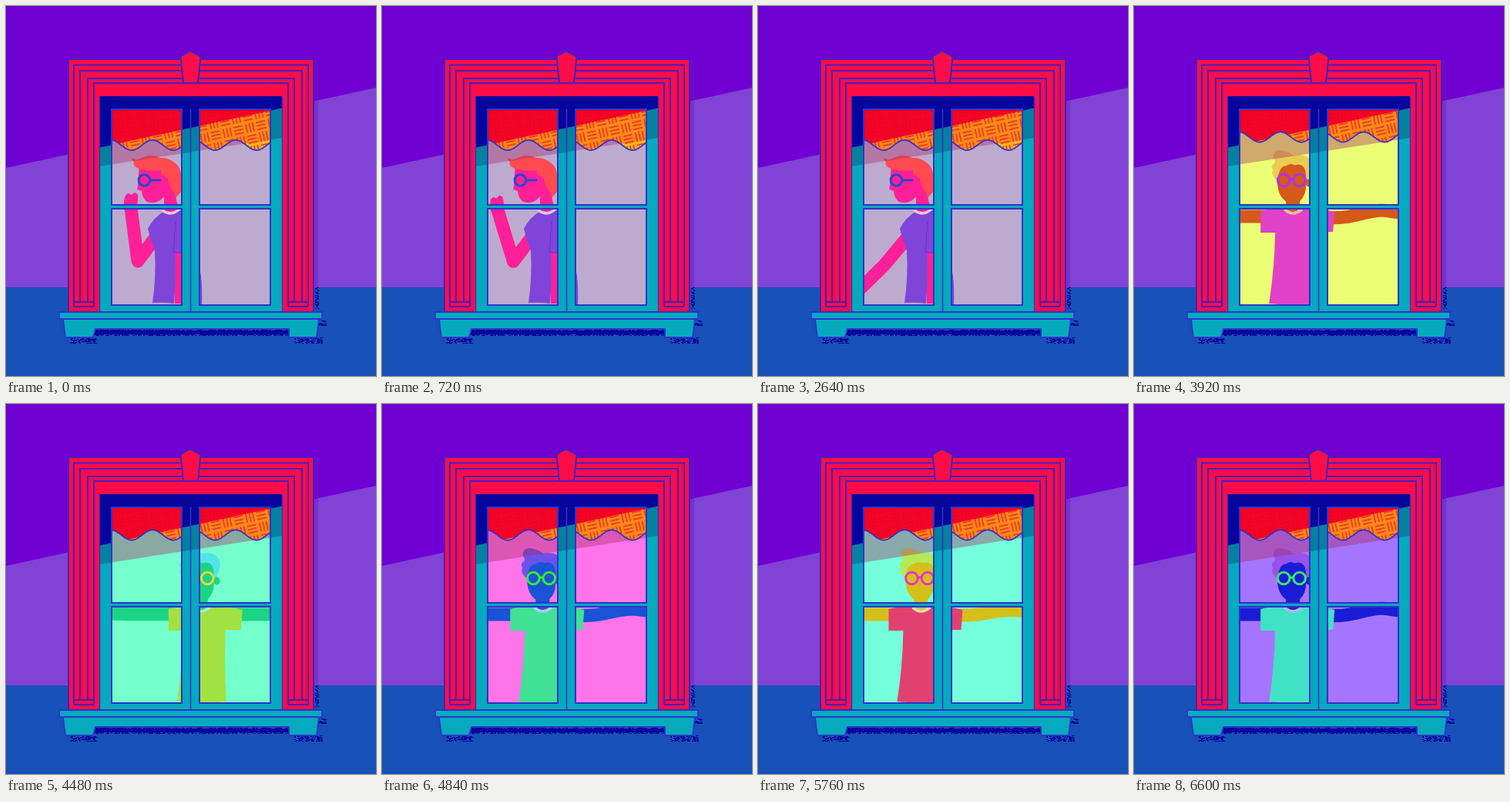
Animation, 480 px wide and 480 px high, one loop 6.64 s. Source, as an HTML page with a canvas:

```html
<!DOCTYPE html>
<html lang="en">
<head>
<meta charset="utf-8">
<title>Window dance</title>
<style>
html, body { margin: 0; width: 100%; height: 100%; overflow: hidden; background: #7000d2; }
canvas { display: block; width: 100vmin; height: 100vmin; }
</style>
</head>
<body>
<canvas id="stage" width="480" height="480"></canvas>
<script>
const ctx = document.getElementById('stage').getContext('2d');
const LOOP = 6640, LIGHTS_ON = 2990, BEAT = 2680 / 3;
const BLUE = '#2c34cc', TRIM = '#4420bc', NAVY = '#07069c', TEAL = '#06a9bd', RED = '#fc0d49';
const PANES = [[137, 134, 91, 124], [251, 134, 92, 124], [137, 263, 91, 125], [251, 263, 92, 125]];
const TAU = Math.PI * 2;

const clamp = v => Math.max(0, Math.min(1, v));
const mix = (a, b, k) => a + (b - a) * k;
const smooth = k => k * k * (3 - 2 * k);
const hsl = (h, s, l) => `hsl(${((h % 360) + 360) % 360},${s}%,${l}%)`;
const beamY = x => 210 - x * 0.2167;

// Piecewise linear value, extended past both ends
function along(points, x) {
  let i = 1;
  while (i < points.length - 1 && x > points[i][0]) i++;
  const [a, b] = [points[i - 1], points[i]];
  return mix(a[1], b[1], (x - a[0]) / (b[0] - a[0]));
}

function random(seed) {
  return () => (seed = (seed * 16807) % 2147483647) / 2147483647;
}

function rect(x, y, w, h, fill) {
  ctx.fillStyle = fill;
  ctx.fillRect(x, y, w, h);
}

function path(d, fill, line, width = 2) {
  const p = new Path2D(d);
  if (fill) { ctx.fillStyle = fill; ctx.fill(p); }
  if (line) { ctx.strokeStyle = line; ctx.lineWidth = width; ctx.stroke(p); }
}

function disc(x, y, rx, ry, fill) {
  ctx.beginPath();
  ctx.ellipse(x, y, rx, ry, 0, 0, TAU);
  ctx.fillStyle = fill;
  ctx.fill();
}

function ring(x, y, r, color) {
  ctx.beginPath();
  ctx.arc(x, y, r, 0, TAU);
  ctx.strokeStyle = color;
  ctx.lineWidth = 3;
  ctx.stroke();
}

function clipPanes() {
  ctx.beginPath();
  for (const p of PANES) ctx.rect(...p);
  ctx.clip();
}

function speckle(x, y, w, h, seed) {
  const rnd = random(seed);
  ctx.fillStyle = NAVY;
  for (let n = w * h * 0.45; n > 0; n--) {
    ctx.fillRect(x + Math.floor(rnd() * w), y + Math.floor(rnd() * h), 2, 1);
  }
}

function wall() {
  rect(0, 0, 480, 480, '#7000d2');
  path(`M0 ${beamY(0)}L480 ${beamY(480)}V365H0Z`, '#8043d5');
  rect(0, 365, 480, 115, '#1851b7');
  rect(400, 70, 5, 295, 'rgba(96,30,190,.4)');
  speckle(401, 365, 4, 28, 11);
}

function frame() {
  rect(80, 69, 320, 327, RED);
  const lines = [[81, 69, 396], [88, 76.5, 390], [96, 84, 384], [106, 94, 384], [114, 100, 390]];
  for (const [x, y, b] of lines) path(`M${x} ${b}V${y}H${480 - x}V${b}`, null, TRIM, 2);
  for (const x of [88, 366]) {
    path(`M${x} 384h26M${x} 390h26`, null, TRIM, 1.8);
  }
  path('M226.5 65.5L239 58.5L252.5 65.5L249 100H230Z', RED, TRIM, 2);
}

function sash() {
  ctx.save();
  ctx.beginPath();
  ctx.rect(121, 117, 238, 280);
  for (const p of PANES) ctx.rect(...p);
  ctx.clip('evenodd');
  rect(121, 117, 238, 280, TEAL);
  path('M121 208L359 171V117H121Z', '#06809f');
  path(`M121 ${beamY(121)}L359 ${beamY(359)}V117H121Z`, NAVY);
  ctx.restore();
  path('M239.5 134V396', null, BLUE, 1.6);
  for (const p of PANES) {
    ctx.strokeStyle = BLUE;
    ctx.lineWidth = 2;
    ctx.strokeRect(...p);
  }
  path('M121.5 117V396M358.5 117V396', null, BLUE, 1.4);
}

function sill() {
  speckle(115, 419, 252, 9, 5);
  rect(116, 421, 250, 5, NAVY);
  speckle(83, 431, 34, 7, 7);
  speckle(374, 430, 36, 8, 9);
  speckle(406, 408, 9, 7, 13);
  path('M74 406H406L403 430H367V419H116L113 430H77Z', TEAL, BLUE, 1.8);
  path('M69 397H410V406H69Z', TEAL, BLUE, 1.8);
}

// Basket weave of three-bar groups
function weave(color, shift) {
  ctx.save();
  ctx.translate(240, 160 + shift);
  ctx.rotate(-0.22);
  ctx.strokeStyle = color;
  ctx.lineWidth = 1.9;
  ctx.beginPath();
  for (let i = -8; i < 8; i++) {
    for (let j = -4; j < 4; j++) {
      for (const k of [-4.5, 0, 4.5]) {
        const x = i * 15, y = j * 15;
        if ((i + j) % 2) { ctx.moveTo(x - 6, y + k); ctx.lineTo(x + 6, y + k); }
        else { ctx.moveTo(x + k, y - 6); ctx.lineTo(x + k, y + 6); }
      }
    }
  }
  ctx.stroke();
  ctx.restore();
}

function blind(mid) {
  let d = '';
  for (let x = 135; x <= 346; x++) {
    d += `${d ? 'L' : 'M'}${x} ${mid - 6.6 * Math.cos(TAU * (x - 190) / 54)}`;
  }
  ctx.save();
  ctx.clip(new Path2D(d + 'V130H135Z'));
  rect(135, 130, 212, 62, '#ff8a12');
  path('M251 188L346 173V195H251Z', '#ffb018');
  weave('#ee3b2c', mid - 181);
  ctx.clip(new Path2D(`M121 ${beamY(121)}L359 ${beamY(359)}V117H121Z`));
  rect(135, 130, 212, 62, '#f40324');
  weave('rgba(205,0,50,.25)', mid - 181);
  ctx.restore();
  path(d, null, BLUE, 1.8);
}

function thinker(t) {
  const skin = '#ff2098', shirt = '#8045d8', hair = '#ff4a50';
  // Back, far arm and shirt
  path('M219 318H230V386H219Z', skin);
  path('M246 325Q256 345 254 388H240Z', shirt);
  path('M204 238L220 236Q219 252 226 266L206 270Z', skin);
  path('M173 206L171 234L170 238L176 240Q177 250 183 254Q196 258 204 248L218 240V205Z', skin);
  path('M162 196Q168 202 176 197Q188 191 200 197Q212 196 222 206Q229 213 228 240L220 249Q219 240 212 233Q211 222 205 220Q200 218 201 213Q186 215 172 211Q163 206 166 203Z', hair);
  ring(179.5, 226, 7.3, '#2846cc');
  path('M187 226H201', null, '#2846cc', 3);

  // Arm swings from the chin down to the switch
  const k = smooth(clamp((t - 640) / 480));
  const ex = mix(171, 164, k), ey = mix(331, 336, k);
  const angle = mix(-1.70, -3.92, k), reach = mix(76, 54, k);
  const hx = ex + Math.cos(angle) * reach, hy = ey + Math.sin(angle) * reach;
  ctx.strokeStyle = skin;
  ctx.lineCap = ctx.lineJoin = 'round';
  ctx.lineWidth = 17;
  ctx.beginPath();
  ctx.moveTo(194, 300);
  ctx.lineTo(ex, ey);
  ctx.lineTo(hx, hy);
  ctx.stroke();
  ctx.save();
  ctx.translate(hx, hy);
  ctx.rotate(angle + 1.7);
  path('M-8 4Q-9 -10 -3 -13L2 -11L6 -14Q11 -12 10 -6Q10 2 6 6Z', skin);
  ctx.restore();
  ctx.lineCap = 'butt';
  ctx.lineJoin = 'miter';

  path('M204 267Q215 274 226 263L230 264V320H219Q221 350 218 386Q203 384 190 385Q195 352 193 318Q187 303 184 289Q191 275 204 267Z', shirt);
  path('M220 280L217 320H229', null, '#6830c4', 1);
  path('M203 265Q214 274 227 262', null, '#eac6dc', 3.5);
}

const REST = [[0, 273], [40, 273], [90, 271]];
const RIGHT_WAVE = [[0, 275], [17, 274], [45, 267], [62, 264], [85, 268], [140, 271]];
const LEFT_WAVE = [[0, 270], [28, 269], [45, 273], [62, 278], [90, 271], [120, 270]];

function arm(x, dir, wave, amount, color) {
  ctx.beginPath();
  for (let s = -12; s <= 125; s += 4) {
    // Light averaging rounds off the bends
    let y = 0;
    for (const o of [-6, 0, 6]) {
      const q = Math.max(0, s + o);
      y += mix(along(REST, q), along(wave, q), amount) / 3;
    }
    ctx.lineTo(x + dir * s, y);
  }
  ctx.strokeStyle = color;
  ctx.lineWidth = 17;
  ctx.stroke();
}

function dancer(t, phase) {
  const turn = along([[3920, 50], [4480, 184], [5200, 319], [6600, 629]], t);
  const skin = hsl(330 + turn, 78, 47), shirt = hsl(260 + turn, 73, 57);
  const hair = hsl(358 + turn, 78, 62), glasses = hsl(229 + turn, 82, 56);
  const dx = 64.5 * (1 - Math.cos(phase * TAU)) / 2;
  const side = Math.cos(phase * TAU);
  ctx.save();
  ctx.translate(dx, 0);
  arm(163, -1, LEFT_WAVE, clamp(-side * 1.8 - 0.8), skin);
  arm(258, 1, RIGHT_WAVE, clamp(side * 1.8 - 0.8), skin);
  path('M163 266Q180 262 194 263Q205 272 217 263Q238 262 259 267L257 293H237Q235 340 238 386Q205 389 174 386Q181 342 182 294H163Z', shirt);
  path('M196 246H214V263Q205 271 196 263Z', skin);
  path('M194 264Q205 274 217 264', null, hsl(318 + turn, 60, 80), 3.5);
  path('M179 196Q180 187 188 187Q198 188 206 194Q222 191 228 200Q232 208 228 218L222 230H188L182 224Q176 218 179 213Q175 207 181 204Q183 201 179 196Z', hair);
  disc(225.5, 229.5, 4.3, 5, skin);
  path('M186 220Q189 207 196 207.5Q201 203 207 206.5Q215 204 219 209Q223 214 222 232Q222 246 214 253Q205 260 195 253Q186 246 185 232Z', skin);
  ring(193, 226, 7.8, glasses);
  ring(213.5, 226, 7.8, glasses);
  path('M200 225H206', null, glasses, 3);
  ctx.restore();
}

function room(t) {
  const on = t >= LIGHTS_ON;
  const phase = (t - 3920) / BEAT + 0.042;
  const beat = ((phase % 1) + 1) % 1;
  const raised = on && (beat < 0.12 || beat > 0.58);
  const hue = along([[3920, 69], [4480, 158], [5200, 460], [6600, 621]], t);
  ctx.save();
  clipPanes();
  rect(121, 117, 240, 280, on ? hsl(hue, 100, 73) : '#bcabcf');
  if (on) dancer(t, phase);
  else thinker(t);
  path('M121 208L359 171V117H121Z', 'rgba(168,42,98,.4)');
  blind(raised ? 170 : 180.5);
  ctx.restore();
}

function draw(now) {
  const t = now % LOOP;
  ctx.clearRect(0, 0, 480, 480);
  wall();
  frame();
  room(t);
  sash();
  sill();
}

const start = performance.now();
function tick() {
  draw(performance.now() - start);
  requestAnimationFrame(tick);
}
tick();
</script>
</body>
</html>
```
